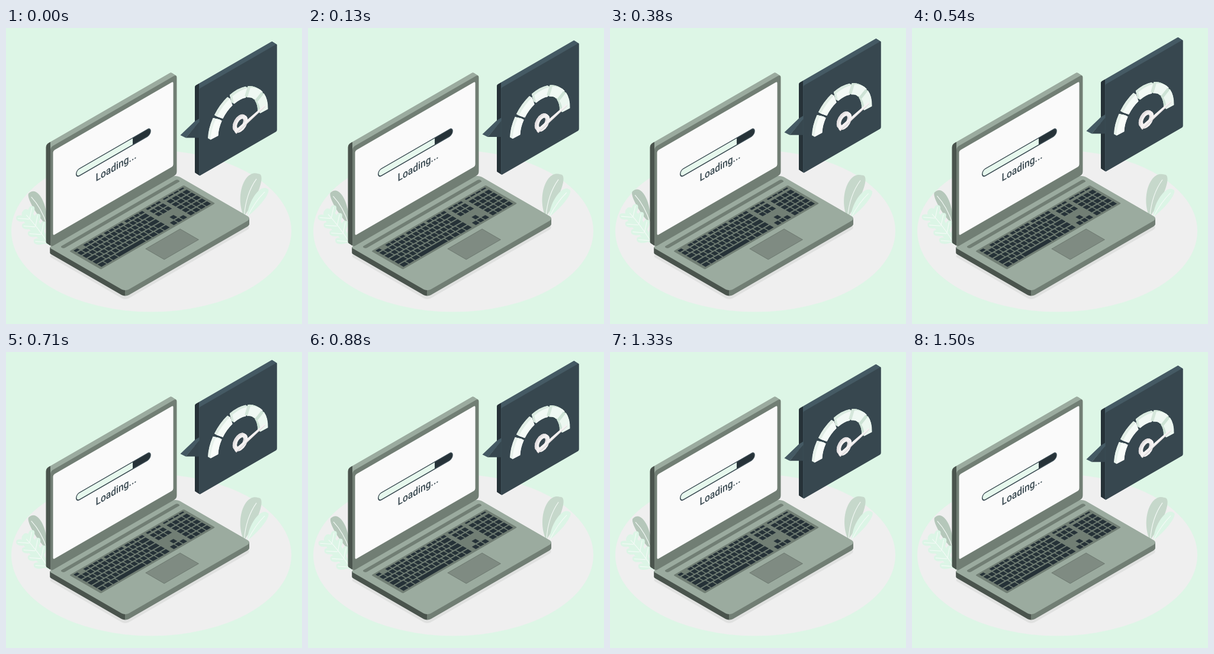
Recreate the animation shown at these times as an HTML page with a canvas. Size 500 by 500 pixels, loop 1540 ms.

```html
<!DOCTYPE html>
<html lang="en">
<head>
<meta charset="utf-8">
<title>Loading</title>
<style>
html, body { margin: 0; width: 100%; height: 100%; overflow: hidden; background: #ddf6e6; }
canvas { display: block; width: 100vw; height: 100vh; }
</style>
</head>
<body>
<canvas id="stage" width="500" height="500"></canvas>
<script>
const ctx = document.getElementById('stage').getContext('2d');
const LOOP = 1540;
const PHASE = 30;
const DARK = '#263238', SLATE = '#37474f', STEEL = '#455a64';
const LIGHT = '#9bab9f', MID = '#717e74', SHADE = '#4a544d';

// Isometric planes: the wall faces right, the floor lies flat.
const WALL = [0.866, -0.5, 0, 1];
const FLOOR = [0.866, -0.5, 0.866, 0.5];

function on(plane, x, y, draw) {
  ctx.save();
  ctx.transform(...plane, x, y);
  draw();
  ctx.restore();
}

function fill(style) {
  ctx.fillStyle = style;
  ctx.fill();
}

function rect(x, y, w, h, radius = 0) {
  ctx.beginPath();
  ctx.roundRect(x, y, w, h, radius);
}

function poly(style, ...points) {
  ctx.beginPath();
  points.forEach(p => ctx.lineTo(...p));
  ctx.closePath();
  fill(style);
}

// Horizontal two-tone paint with a hard edge at x.
function split(x, left, right) {
  const paint = ctx.createLinearGradient(x - 0.5, 0, x + 0.5, 0);
  paint.addColorStop(0, left);
  paint.addColorStop(1, right);
  return paint;
}

// Stacks a flat shape from (x - dx, y - dy) up to its front at (x, y).
function extrude(plane, x, y, dx, dy, shape, side, front) {
  const steps = 16;
  for (let i = steps; i >= 0; i--) {
    on(plane, x - dx * i / steps, y - dy * i / steps, shape);
    fill(i ? side : front);
  }
}

function drawFloor() {
  ctx.fillStyle = '#ddf6e6';
  ctx.fillRect(0, 0, 500, 500);
  ctx.beginPath();
  ctx.ellipse(245.5, 343, 236.5, 136.5, 0, 0, Math.PI * 2);
  fill('#efefef');
}

// Leaf from its base to its tip, bulging to each side; returns points along it.
function leaf(x, y, tipX, tipY, left, right, color) {
  const dx = tipX - x, dy = tipY - y, size = Math.hypot(dx, dy);
  const at = (t, off) => [x + dx * t - dy / size * off, y + dy * t + dx / size * off];
  ctx.beginPath();
  ctx.moveTo(x, y);
  ctx.bezierCurveTo(...at(0.35, -left), ...at(1, -left), tipX, tipY);
  ctx.bezierCurveTo(...at(1.07, right), ...at(0.5, right), x, y);
  fill(color);
  return at;
}

function vein(at, bend) {
  ctx.beginPath();
  ctx.moveTo(...at(0.02, 0));
  ctx.quadraticCurveTo(...at(0.5, bend), ...at(0.88, 0));
  ctx.strokeStyle = '#f5faf7';
  ctx.lineWidth = 1.1;
  ctx.stroke();
}

function drawPlants(degrees) {
  ctx.save();
  ctx.translate(250, 250);
  ctx.rotate(degrees * Math.PI / 180);
  ctx.translate(-250, -250);

  const pale = '#dcf5e6';
  vein(leaf(402, 318, 426, 246, 25, 13, '#c6d8cb'), -9);
  vein(leaf(408, 318, 441, 271, 14, 9, pale), -4);
  vein(leaf(70, 334, 39, 279, 8, 19, '#b5c7ba'), 6);

  const at = leaf(74, 368, 29, 309, 14, 14, pale);
  for (let t = 0.1; t < 0.8; t += 0.22) {
    for (const side of [-1, 1]) vein(leaf(...at(t, 0), ...at(t + 0.2, side * 17), 7, 7, pale), 0);
  }
  vein(at, 3);
  ctx.restore();
}

function drawKeyboard() {
  rect(0, 0, 223, 61.5, 2);
  fill(MID);
  ctx.fillStyle = DARK;
  const rowY = i => 10.5 + i * 9.9;
  const key = (x, y, w, h = 7.7) => ctx.fillRect(x, y, w - 1.8, h);
  const keys = (x, y, count, w, h) => {
    for (let i = 0; i < count; i++) key(x + i * w, y, w, h);
  };

  // Each main row starts with a wider key; its last key takes what is left.
  const left = 5, right = 140, pitch = 9.2;
  for (let i = 0; i < 4; i++) {
    const first = pitch * (1 + 0.35 * i);
    const count = Math.floor((right - left - first) / pitch) - 1;
    const end = left + first + count * pitch;
    key(left, rowY(i), first);
    keys(left + first, rowY(i), count, pitch);
    key(end, rowY(i), right - end);
  }
  keys(left, rowY(4), 3, 11.5);
  key(39.5, rowY(4), 54);
  keys(93.5, rowY(4), 4, 11.6);

  for (let group = 0; group < 3; group++) keys(24 + group * 40, 3, 4, pitch, 5);
  key(left, 3, pitch, 5);
  for (const row of [0, 1, 4]) keys(146, rowY(row), 3, 9.3);
  key(155.3, rowY(3), 9.3);
  for (let row = 0; row < 5; row++) keys(179, rowY(row), 4, 10.3);
  keys(146, 3, 3, 9.3, 4);
  keys(179, 3, 4, 10.3, 3);
}

function drawLaptop() {
  const base = () => rect(0, -3, 246.5, 149, [4, 9, 8, 7]);
  on(FLOOR, 75, 387, base);
  fill('#e0e1e0');
  extrude(FLOOR, 75, 372, 0, -9.5, base, split(201, SHADE, MID), LIGHT);

  on(FLOOR, 75, 372, () => {
    rect(12, 7, 228, 6.5, 3.2);
    fill(MID);
    rect(91.5, 93.5, 68, 37);
    fill('#6c786f');
    rect(92.5, 94.5, 66, 35);
    fill('#7f8b82');
  });
  on(FLOOR, 107, 377, drawKeyboard);

  extrude(WALL, 75, 201.5, 7.5, 4.8, () => rect(0, 0, 246.5, 169, 5), split(75, SHADE, LIGHT), MID);
  on(WALL, 79.5, 207.5, () => rect(0, 0, 234.5, 143, 3));
  fill('#fafafa');
}

function drawScreen() {
  on(WALL, 118, 247, () => {
    const bar = () => rect(0.8, -5.9, 144.8, 11.8, 5.9);
    ctx.save();
    bar();
    ctx.clip();
    ctx.fillStyle = split(111, '#e6f8ed', DARK);
    ctx.fillRect(0, -7, 148, 14);
    ctx.restore();
    bar();
    ctx.strokeStyle = SLATE;
    ctx.lineWidth = 1.7;
    ctx.stroke();
  });
  on(WALL, 151.5, 259.5, () => {
    ctx.font = '500 18px Roboto, sans-serif';
    ctx.fillStyle = SLATE;
    ctx.fillText('Loading...', 0, 0);
  });
}

function ringSector(outer, inner, from, to) {
  ctx.beginPath();
  ctx.arc(0, 0, outer, from, to);
  ctx.arc(0, 0, inner, to, from, true);
  ctx.closePath();
}

function drawGauge() {
  const step = Math.PI / 5 + 0.015, gap = 0.04;
  for (let i = 0; i < 5; i++) {
    const from = Math.PI + i * step;
    extrude(WALL, 394, 163.5, 4.5, 2.5, () => ringSector(56, 41, from + gap, from + step - gap),
      `hsl(142 28% ${93 - i * 2}%)`, `hsl(142 40% ${98 - i * 0.8}%)`);
  }
  extrude(WALL, 397, 162.5, 3, 1.8, () => ringSector(13, 8, 0, Math.PI * 2), '#e3dfe0', '#f3f0f0');
  poly('#dcd8d9', [386, 176], [389, 179.5], [438, 133.5], [437, 132]);
  poly('#f5f2f2', [385.5, 174.5], [388.5, 178], [438, 132.5], [436.5, 130.5]);
}

function drawPanel(lift) {
  ctx.save();
  ctx.translate(0, -lift);
  extrude(WALL, 326.5, 103, 7.5, 4.8, () => rect(0, 0, 151.5, 147.5, 2), split(326, DARK, STEEL), SLATE);
  poly(STEEL, [294.5, 181.5], [319, 158], [326.5, 153.5], [326.5, 160], [303.5, 186]);
  poly(SLATE, [303.5, 186], [326.5, 159], [326.5, 186]);
  drawGauge();
  ctx.restore();
}

// Triangle wave: 0 to 1 to 0 over one cycle.
const triangle = p => 1 - Math.abs(1 - 2 * (p % 1));

function render(now) {
  const p = (now + PHASE) / LOOP;
  drawFloor();
  drawPlants(2 * triangle(p + 0.25) - 1);
  drawLaptop();
  drawScreen();
  drawPanel(10 * triangle(p));
}

let start;
function tick(now) {
  start ??= now;
  render((now - start) % LOOP);
  requestAnimationFrame(tick);
}
render(0);
requestAnimationFrame(tick);
</script>
</body>
</html>
```
